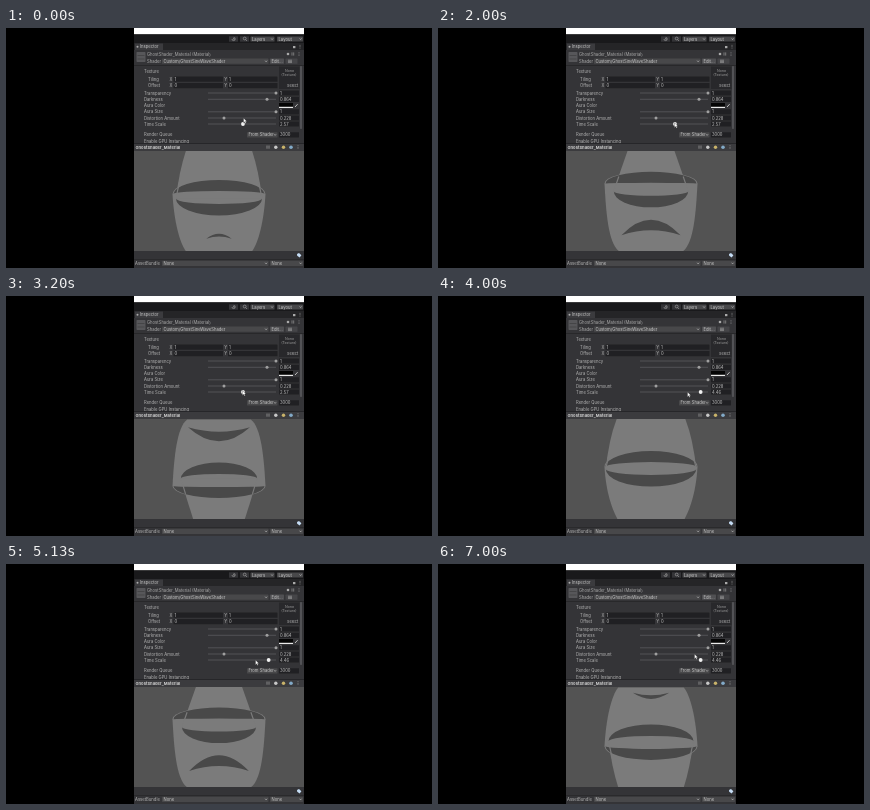
Animation of 426x240 px, one loop 7070 ms. Source, as an HTML page:

```html
<!DOCTYPE html>
<html lang="en">
<head>
<meta charset="utf-8">
<title>Ghost shader inspector</title>
<style>
html, body { margin: 0; width: 100%; height: 100%; overflow: hidden; background: #000; }
svg { display: block; width: 100vw; height: 100vh; }
text { font-family: Inter, Roboto, sans-serif; }
</style>
</head>
<body>
<svg id="stage" viewBox="0 0 426 240">
  <defs>
    <clipPath id="view"><rect x="128" y="123" width="170" height="100"/></clipPath>
    <clipPath id="panel"><rect x="128" y="6" width="170" height="109.5"/></clipPath>
  </defs>
  <rect width="426" height="240"/>
  <rect x="128" width="170" height="6.5" fill="#fff"/>
  <rect x="128" y="6.5" width="170" height="233.5" fill="#343437"/>
  <g id="ui" clip-path="url(#panel)"></g>
  <g id="footer"></g>
  <g clip-path="url(#view)">
    <rect x="128" y="123" width="170" height="100" fill="#535353"/>
    <g id="ghost">
      <path id="body" fill="#7b7b7b"/>
      <path id="cone" fill="#7b7b7b"/>
      <path id="backBand" fill="#494949"/>
      <path id="frontBand" fill="#494949"/>
      <path id="edges" fill="none" stroke="#7b7b7b" stroke-width="1.2"/>
      <path id="mouth" fill="#494949"/>
    </g>
  </g>
  <circle id="knob" cy="96" r="1.9" fill="#f0f0f0"/>
  <path id="cursor" d="M0 -2.5V2.4L1.2 1.3L2 3L2.8 2.6L2 1H3.4Z" fill="#fff" stroke="#222" stroke-width=".3"/>
</svg>
<script>
const LOOP = 7070, FRAME = 200 / 3;
const $ = id => document.getElementById(id);
const ui = $("ui"), footer = $("footer");

function add(parent, tag, attrs, content = "") {
  const el = document.createElementNS("http://www.w3.org/2000/svg", tag);
  for (const key in attrs) el.setAttribute(key, attrs[key]);
  el.textContent = content;
  return parent.appendChild(el);
}
const box = (x, y, width, height, fill, parent = ui, rx = 0) =>
  add(parent, "rect", { x, y, width, height, fill, rx });
const label = (x, y, words, parent = ui, fill = "#b4b4b4", size = 4.2, weight = 400) =>
  add(parent, "text", { x, y: y + 1.5, fill, "font-size": size, "font-weight": weight }, words);
const dot = (cx, cy, r, fill, parent = ui) => add(parent, "circle", { cx, cy, r, fill });
const line = (d, stroke = "#aaa", parent = ui, width = 0.6) =>
  add(parent, "path", { d, stroke, fill: "none", "stroke-width": width });

function dropdown(x, y, width, words, parent = ui) {
  box(x, y - 2.6, width, 5.2, "#48484a", parent, 0.6);
  label(x + 1.5, y, words, parent, "#c8c8c8");
  const end = x + width - 3.4;
  line(`M${end} ${y - 0.6}l1 1.2l1 -1.2`, "#ccc", parent);
}
function field(x, y, width, words) {
  box(x, y - 2.6, width, 5.2, "#202023", ui, 0.4);
  return label(x + 1, y, words, ui, "#c0c0c0");
}
function menuDots(x, y, parent = ui) {
  for (const dy of [-1.4, 0, 1.4]) dot(x, y + dy, 0.45, "#b0b0b0", parent);
}
function slider(y, name, value, handle) {
  label(138, y, name);
  line(`M202 ${y}H270`, "#66666a");
  if (handle) dot(handle, y, 1.5, "#a0a0a0");
  return field(273, y, 20, value);
}

// Toolbar and tab strip
box(128, 6.5, 170, 8.5, "#19191b");
box(223, 8.3, 9, 5.4, "#343437");
box(234, 8.3, 9, 5.4, "#343437");
line("M226 11a1.6 1.6 0 1 0 1.6 -1.6M227.6 10v1.2h1");
line("M240.1 10.5a1.4 1.4 0 1 0 -2.8 0a1.4 1.4 0 1 0 2.8 0M239.7 11.6l1.3 1.4");
dropdown(244.5, 11, 24, "Layers");
dropdown(271, 11, 26, "Layout");
box(128, 15, 170, 7, "#252527");
box(129, 15.5, 28, 6.5, "#3b3b3e");
dot(131.5, 18.7, 1, "#aaa");
label(134, 18.7, "Inspector", ui, "#c8c8c8");
box(287, 18, 2.4, 2.2, "#aaa");
menuDots(294, 18.7);

// Material header
box(130.5, 24, 9, 10, "#57575a", ui, 0.7);
line("M131.5 27.5H138.5M131.5 31H138.5", "#39393c");
label(141, 26, "GhostShader_Material (Material)", ui, "#aaa");
dot(282, 26, 1.3, "#aaa");
line("M286 24.4v3.2M287.7 24.4v3.2");
menuDots(293, 26);
label(141, 33.2, "Shader");
dropdown(156, 33.2, 106.5, "Custom/GhostSineWaveShader");
box(264, 30.6, 14, 5.2, "#505053", ui, 0.6);
label(265.5, 33.2, "Edit...", ui, "#ccc");
box(279.5, 30.6, 12, 5.2, "#454548", ui, 0.6);
line("M282 32.2h4M282 33.4h4M282 34.6h4");
box(128, 37, 170, 0.6, "#202022");
box(294.2, 38, 1.6, 63, "#5b5b5e", ui, 0.8);

// Properties
label(138, 43, "Texture");
box(273, 38.5, 20.5, 22.5, "#28282b");
label(279, 42.7, "None", ui, "#999", 3.6);
label(275.2, 46.4, "(Texture)", ui, "#999", 3.6);
label(281, 57.5, "Select", ui, "#bbb", 3.8);
[["Tiling", 51.2, "1"], ["Offset", 57.7, "0"]].forEach(([name, y, value]) => {
  label(142, y, name);
  label(163.5, y, "X");
  field(167.5, y, 49.5, value);
  label(218.2, y, "Y");
  field(222, y, 49.5, value);
});
slider(65, "Transparency", "1", 270);
slider(71.3, "Darkness", "0.864", 261);
label(138, 77.5, "Aura Color");
box(273, 75, 14, 4.2, "#050505");
box(273, 78.8, 14, 1.1, "#fff");
line("M289 79l2.6 -2.8", "#ccc", ui, 0.9);
slider(83.8, "Aura Size", "1", 270);
slider(90, "Distortion Amount", "0.228", 218);
const readout = slider(96, "Time Scale", "2.57");
label(138, 106.8, "Render Queue");
dropdown(241, 106.8, 30.5, "From Shader");
field(273, 106.8, 20, "3000");
label(138, 113.2, "Enable GPU Instancing");

// Preview header and asset bundle bar
box(128, 115.5, 170, 7.5, "#3b3b3e", footer);
box(128, 115.2, 170, 0.6, "#1c1c1e", footer);
label(129.5, 119, "GhostShader_Material", footer, "#d0d0d0", 4.1, 700);
line("M261 117.5v3.2M263 117.5v3.2", "#bbb", footer);
dot(269.8, 119.2, 1.7, "#c8c8c8", footer);
dot(277.5, 119.2, 1.7, "#c9b36a", footer);
dot(285, 119.2, 1.8, "#82aac8", footer);
menuDots(292, 119.2, footer);
box(128, 223, 170, 8.5, "#343437", footer);
add(footer, "path", { d: "M291 226l2 -1l2.4 2.3l-1.8 2.2l-2.4 -1.8Z", fill: "#c5dcf4" });
box(128, 231.2, 170, 0.5, "#202022", footer);
label(129, 235.3, "AssetBundle", footer);
dropdown(156, 235.3, 106.5, "None", footer);
dropdown(264, 235.3, 33, "None", footer);

// Piecewise track of [time, value] points
function track(t, points) {
  let i = 1;
  while (i < points.length - 1 && t > points[i][0]) i++;
  const [t0, a] = points[i - 1], [t1, b] = points[i];
  const p = Math.min(1, Math.max(0, (t - t0) / (t1 - t0)));
  return a + (b - a) * p * p * (3 - 2 * p);
}

// The wave runs faster once the time scale has been dragged up.
function wavePhase(t) {
  const slow = s => 2.4 * s - 1.9;
  const fast = s => 4 * Math.PI - 1.65 + 4.35 * (s - 4);
  if (t < 3.3) return slow(t);
  if (t > 3.75) return fast(t);
  return slow(3.3) + (fast(3.75) - slow(3.3)) * (t - 3.3) / 0.45;
}

// Poses with a positive shift mirror the negative ones about y = 173.5.
function drawGhost(shift) {
  const k = Math.abs(shift), root = Math.sqrt(k), cx = 213;
  const down = shift > 0;
  const yc = 173.5 - 12.5 * k, rim = 46.5, rimY = yc - 6 * root;
  const base = 46 - 9 * k, baseY = yc + 2 * root;
  const top = 34 - 11.5 * k * k, bulge = (base + top) / 2 + 2.5 * (1 - k);
  const foot = 33.5 - 2 * k, hip = 37 + 6 * k;
  const at = (x, y) => `${cx + x} ${y}`;
  const arc = (r, height, sweep, x, y) =>
    `A${r} ${Math.max(0.1, height)} 0 0 ${sweep} ${at(x, y)}`;
  // Crescent between two half ellipses; dir is -1 for an arch, 1 for a bowl.
  const crescent = (r, y, outer, inner, dir) => {
    const bend = dir * (inner - y) > 0 ? 1 : 0;
    const sweep = dir < 0 ? 1 : 0;
    const back = bend ? 1 - sweep : sweep;
    return `M${at(-r, y)}${arc(r, Math.abs(outer - y), sweep, r, y)}` +
      `${arc(r, Math.abs(inner - y), back, -r, y)}Z`;
  };

  $("ghost").setAttribute("transform", down ? "translate(0 347) scale(1 -1)" : "");
  $("body").setAttribute("d",
    `M${at(-rim, rimY)}${arc(rim, rimY - yc + 18, 1, rim, rimY)}` +
    `C${at(rim - 1.5, rimY + 28)} ${at(hip, 216)} ${at(foot, 223.5)}H${cx - foot}` +
    `C${at(-hip, 216)} ${at(1.5 - rim, rimY + 28)} ${at(-rim, rimY)}Z`);
  $("cone").setAttribute("d",
    `M${at(-base, baseY)}Q${at(-bulge, 142)} ${at(-top, 122)}H${cx + top}` +
    `Q${at(bulge, 142)} ${at(base, baseY)}Z`);
  $("backBand").setAttribute("d", crescent(rim - 1, rimY, yc - 17.5, yc - 6.5, -1));
  $("frontBand").setAttribute("d", crescent(base, baseY, yc + 18, yc + 6.5, 1));
  const edgeX = base + (top - base) * 0.36, edgeY = baseY + (122 - baseY) * 0.36;
  $("edges").setAttribute("d",
    `M${at(-base, baseY)}L${at(-edgeX, edgeY)}M${at(base, baseY)}L${at(edgeX, edgeY)}`);

  const open = Math.max(0, (k - 0.26) / 0.74);
  const half = (down ? 33 : 30) * open ** 0.35;
  const lip = 211 - 4 * open + (down ? 8 : 0);
  const rise = 4 + 12 * open, thick = 2 + 9 * open;
  $("mouth").setAttribute("d", open
    ? `M${at(-half, lip)}Q${at(0, lip - 2 * rise)} ${at(half, lip)}` +
      `Q${at(0, lip - 2 * (rise - thick))} ${at(-half, lip)}Z`
    : "");
}

function render(ms) {
  const step = Math.min(105, Math.floor((ms % LOOP + 3.4) / FRAME));
  const t = step * FRAME / 1000;
  const scale = track(t, [[3.3, 2.57], [3.7, 4.46]]);
  readout.textContent = scale.toFixed(2);
  $("knob").setAttribute("cx", 202 + 13.6 * scale);
  const x = track(t, [[0, 237.5], [0.5, 236.5], [3.3, 236.5], [3.7, 262], [3.95, 249.5], [5.8, 249.5], [6.6, 256.5]]);
  const y = track(t, [[0, 92.5], [0.5, 97.5], [3.7, 97], [3.95, 98.5], [5.8, 98.5], [6.6, 92.5]]);
  $("cursor").setAttribute("transform", `translate(${x} ${y})`);
  drawGhost(Math.cos(wavePhase(t)));
}

const start = performance.now();
function tick() {
  render(performance.now() - start);
  requestAnimationFrame(tick);
}
tick();
</script>
</body>
</html>
```
